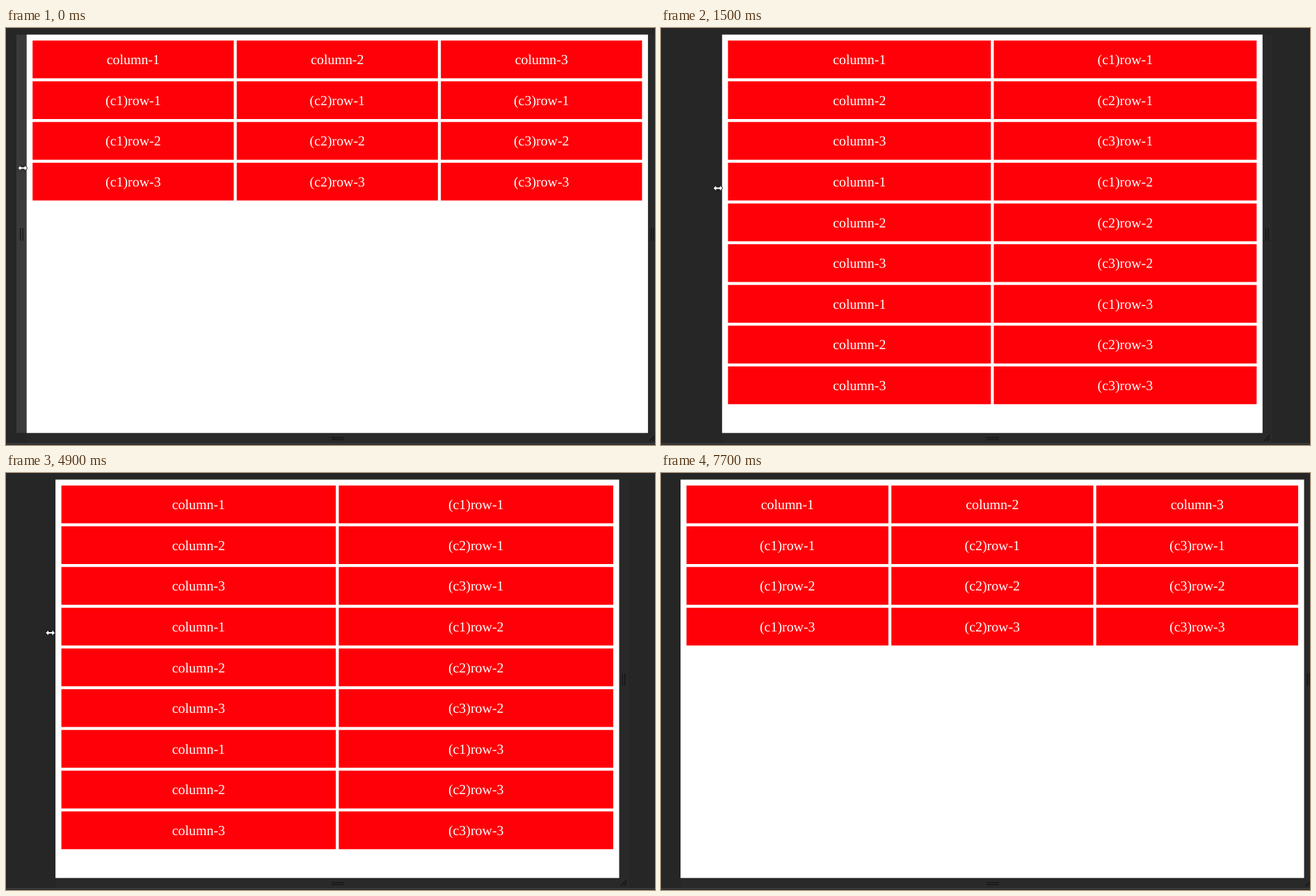
Recreate the animation shown at these times as an HTML page. Size 933 by 600 pixels, loop 8000 ms.

```html
<!DOCTYPE html>
<html lang="en">
<head>
<meta charset="utf-8">
<title>Responsive table</title>
<style>
html, body { margin: 0; width: 100%; height: 100%; overflow: hidden; background: #262626; }
svg { display: block; width: 933px; height: 600px; }
text {
  font: 19.9px "Liberation Serif", "Times New Roman", serif;
  text-rendering: geometricPrecision;
  text-anchor: middle;
  fill: #fff;
}
.grip { fill: none; stroke: #111; stroke-width: 1.1; }
</style>
</head>
<body>
<svg id="stage" viewBox="0 0 933 600">
  <rect width="933" height="600" fill="#262626"/>
  <rect id="right" y="9.5" width="14" height="573.2" fill="#292929"/>
  <rect id="bottom" y="582.7" height="14.5" fill="#292929"/>
  <rect y="597.6" width="933" height="1.2" fill="#484848"/>
  <g id="hover">
    <rect x="15" y="9.5" width="15" height="573.2" fill="#3b3b3b"/>
    <path class="grip" d="M20.7 288v18M24.2 288v18"/>
  </g>
  <path class="grip" d="M468 589.2h18M468 592.2h18"/>
  <g id="handles">
    <path class="grip" d="M4.7 288v18M8.2 288v18"/>
    <path class="grip" d="M2.5 594l8-8M7 594l3.5-3.5"/>
  </g>
  <rect id="page" y="9.5" height="573.2" fill="#fff"/>
  <g id="table"></g>
  <path id="cursor" d="M-7 0l4.7-4.6v3h4.6v-3l4.7 4.6l-4.7 4.6v-3h-4.6v3z" fill="#fff" stroke="#111" stroke-width="1"/>
</svg>
<script>
const LOOP = 8000, CENTER = 476.3, BREAKPOINT = 830;
const ZOOM = 1.0657; // screen pixels per page pixel
const MARGIN = 8 * ZOOM, GAP = 4 * ZOOM, ROW_H = 51 * ZOOM;
const PAGE_TOP = 9.5, BASELINE = 32 * ZOOM;
const DRAG_START = 500, CURSOR_OFF = 7700;

// Drag path, interpolated linearly between these moments
const path = [
  { t: 400, half: 446.6, x: 24, y: 201.5 },
  { t: 800, half: 425.5, x: 46, y: 206 },
  { t: 1500, half: 388.5, x: 82, y: 230.5 },
  { t: 4400, half: 391.5, x: 71.7, y: 230.5 },
  { t: 4900, half: 405.2, x: 63.7, y: 230 },
  { t: 5700, half: 429, x: 39.2, y: 227.5 },
  { t: 6700, half: 448.2, x: 22.8, y: 227.2 }
];

// The screen repaints only at these times, so the drag moves in jumps
const repaints = [0, 500, 600, 700, 800, 1500, 4400, 4700, 4900, 5700, 6000, 6200, 6500, 6700];

const $ = id => document.getElementById(id);
const set = (el, attrs) => {
  for (const key in attrs) el.setAttribute(key, attrs[key]);
};
const show = (el, visible) => set(el, { display: visible ? "inline" : "none" });
const add = (tag, attrs) => {
  const el = document.createElementNS("http://www.w3.org/2000/svg", tag);
  set(el, attrs);
  return $("table").appendChild(el);
};

const cells = Array.from({ length: 18 }, () => ({
  box: add("rect", { height: ROW_H, fill: "#ff0008" }),
  label: add("text", {})
}));

function poseAt(t) {
  const next = path.findIndex(p => p.t > t);
  if (next === 0) return path[0];
  if (next < 0) return path[path.length - 1];
  const a = path[next - 1], b = path[next];
  const u = (t - a.t) / (b.t - a.t);
  const mix = key => a[key] + (b[key] - a[key]) * u;
  return { half: mix("half"), x: mix("x"), y: mix("y") };
}

const heading = c => `column-${c + 1}`;
const entry = (c, r) => `(c${c + 1})row-${r}`;

function labelFor(wide, col, row) {
  if (wide) return row ? entry(col, row) : heading(col);
  return col ? entry(row % 3, Math.floor(row / 3) + 1) : heading(row % 3);
}

function layTable(left, width) {
  const wide = width > BREAKPOINT;
  const cols = wide ? 3 : 2;
  const count = wide ? 12 : 18;
  const cellW = (width - 2 * MARGIN - (cols - 1) * GAP) / cols;
  cells.forEach(({ box, label }, i) => {
    const col = i % cols, row = Math.floor(i / cols);
    const x = left + MARGIN + col * (cellW + GAP);
    const y = PAGE_TOP + MARGIN + row * (ROW_H + GAP);
    set(box, { x, y, width: cellW });
    set(label, { x: x + cellW / 2, y: y + BASELINE });
    label.textContent = labelFor(wide, col, row);
    show(box, i < count);
    show(label, i < count);
  });
}

function draw(time) {
  const t = time % LOOP;
  const { half, x, y } = poseAt(repaints.filter(r => r <= t).pop());
  const left = CENTER - half, right = CENTER + half, width = 2 * half;
  set($("page"), { x: left, width });
  set($("right"), { x: right });
  set($("bottom"), { x: left, width: width + 14 });
  set($("handles"), { transform: `translate(${right} 0)` });
  set($("cursor"), { transform: `translate(${x} ${y})` });
  show($("hover"), t < DRAG_START);
  show($("cursor"), t < CURSOR_OFF);
  layTable(left, width);
}

const origin = performance.now();
function tick() {
  draw(performance.now() - origin);
  requestAnimationFrame(tick);
}
tick();
</script>
</body>
</html>
```
